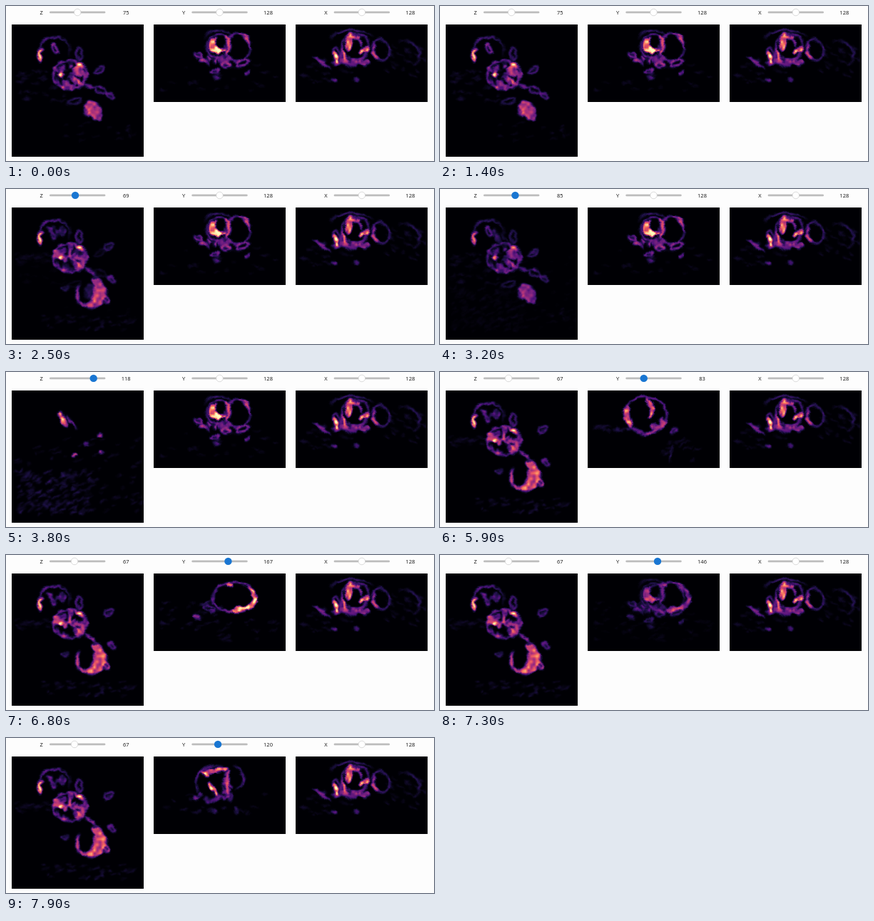
Write an HTML page with a canvas that moves like this. It is 600 px wide and 218 px high and loops after 8 s.

```html
<!DOCTYPE html>
<html>
<head>
<meta charset="utf-8">
<style>
html, body { margin: 0; width: 100%; height: 100%; overflow: hidden; background: #fdfdfd; }
canvas { display: block; }
</style>
</head>
<body>
<canvas id="stage" width="600" height="218"></canvas>
<script>
const W = 600, H = 218, LOOP = 8000, TOP = 26, TURN = 2 * Math.PI;
const view = document.getElementById('stage').getContext('2d');

function layer(w = W, h = H) {
  const c = document.createElement('canvas');
  c.width = w; c.height = h;
  return c.getContext('2d', { willReadFrequently: true });
}
const ink = layer(), soft = layer();

// Magma-like colour ramp
const stops = ['000004', '1c1044', '4f127b', '812581', 'b5367a', 'e55064', 'fb8761', 'fec287', 'fcfdbf']
  .map(s => [0, 2, 4].map(i => parseInt(s.substr(i, 2), 16)));
const ramp = Array.from({ length: 256 }, (_, i) => {
  const p = i / 255 * 8, k = Math.min(7, Math.floor(p));
  return stops[k].map((c, j) => c + (stops[k + 1][j] - c) * (p - k));
});

function seeded(seed) {
  return () => (seed = (seed * 16807) % 2147483647) / 2147483647;
}
const lattice = Array.from({ length: 4096 }, seeded(4711));
function noise(x, y) {
  const i = Math.floor(x), j = Math.floor(y), u = x - i, v = y - j;
  const at = (a, b) => lattice[(a + b * 67) & 4095];
  const top = at(i, j) * (1 - u) + at(i + 1, j) * u;
  const low = at(i, j + 1) * (1 - u) + at(i + 1, j + 1) * u;
  return top * (1 - v) + low * v;
}

// Drawing helpers: level is the brightness from 0 to 1
function spot(level, x, y, rx, ry = rx, turn = 0) {
  ink.fillStyle = `rgb(${Array(3).fill(Math.round(level * 255))})`;
  ink.beginPath();
  ink.ellipse(x, y, rx, ry, turn, 0, TURN);
  ink.fill();
}
// Stroke that swells towards its middle
function swell(level, width, point) {
  const steps = 60;
  for (let i = 0; i <= steps; i++) {
    const u = i / steps, [x, y] = point(u);
    spot(level, x, y, width / 2 * (.25 + .75 * Math.sin(Math.PI * u)));
  }
}
function bar(level, width, x0, y0, x1, y1) {
  swell(level, width, u => [x0 + (x1 - x0) * u, y0 + (y1 - y0) * u]);
}
function arc(level, width, x, y, rx, ry, from, to) {
  swell(level, width, u => {
    const a = from + (to - from) * u;
    return [x + rx * Math.cos(a), y + ry * Math.sin(a)];
  });
}
function ring(level, width, x, y, rx, ry = rx, turn = 0) {
  ink.strokeStyle = `rgb(${Array(3).fill(Math.round(level * 255))})`;
  ink.lineWidth = width;
  ink.beginPath();
  ink.ellipse(x, y, rx, ry, turn, 0, TURN);
  ink.stroke();
}
function lens(level, x, y, r, turn = 0) {
  ring(level, 2, x, y, r, r * .4, turn);
}
function scatter(count, level, x, y, rx, ry, seed) {
  const r = seeded(seed);
  for (let i = 0; i < count; i++) {
    const a = r() * TURN, d = Math.sqrt(r());
    lens(level * (.5 + .5 * r()), x + rx * d * Math.cos(a), y + ry * d * Math.sin(a), 2 + 3 * r(), r() * 3);
  }
}
function streaks(count, level, x, y, w, h, slope, seed) {
  const r = seeded(seed);
  for (let i = 0; i < count; i++) {
    const a = x + r() * w, b = y + r() * h, len = 3 + r() * 11;
    bar(level * (.4 + .6 * r()), 1.2, a, b, a + len, b + len * slope);
  }
}

// Parts that neighbouring Z slices share
function headAndBody(rim, seed) {
  arc(rim, 2.5, 68, 63, 22, 19, 2.6, 6.6);
  arc(.85, 5, 58, 70, 12, 13, 2.5, 4.1);
  lens(rim, 103, 67, 9, 1.5);
  ring(.36, 3, 90, 97, 23, 20);
  scatter(24, .58, 90, 97, 22, 19, seed);
  spot(.98, 77, 96, 3.5);
  spot(.85, 104, 84, 5, 2.5, .6);
  spot(.75, 102, 106, 5, 2.5, .9);
}

const zSlices = {
  67() {
    streaks(20, .11, 12, 90, 50, 15, -.12, 31);
    streaks(35, .14, 50, 178, 125, 22, -.2, 33);
    headAndBody(.36, 55);
    scatter(9, .42, 68, 62, 16, 13, 12);
    bar(.65, 4, 88, 82, 92, 102);
    bar(.42, 2.5, 110, 111, 130, 125);
    arc(.66, 17, 115, 145, 17, 19, -1.2, 1.7);
    arc(.52, 5, 117, 147, 18, 18, .8, 3.8);
    lens(.62, 141, 155, 6, 1.2);
    lens(.32, 143, 82, 7, -.65);
    lens(.38, 149, 127, 6, .8);
    lens(.26, 83, 140, 5);
  },
  75() {
    streaks(40, .11, 12, 90, 70, 45, -.15, 41);
    streaks(15, .1, 80, 165, 100, 30, -.2, 43);
    headAndBody(.3, 91);
    lens(.6, 68, 60, 7, 1.05);
    lens(.38, 130, 91, 7, -.7);
    lens(.42, 133, 119, 9, .5);
    lens(.36, 147, 126, 6, .6);
    lens(.27, 96, 134, 10, -.25);
    bar(.36, 2.5, 109, 111, 126, 116);
    spot(.5, 123, 147, 16, 9, .9);
    scatter(14, .68, 122, 147, 9, 11, 17);
  },
  118() {
    streaks(120, .21, 12, 140, 105, 62, -.6, 61);
    streaks(70, .12, 10, 95, 175, 105, -.35, 63);
    ring(.55, 2.2, 80, 67, 11, 3, 1.08);
    bar(.85, 4, 76, 58, 83, 75);
    bar(.45, 2.2, 84, 60, 101, 81);
    lens(.36, 113, 101, 3, 1.1);
    spot(.62, 131, 89, 2.3);
    spot(.82, 96, 117, 3.2, 2.3, -.5);
    spot(.52, 133, 113, 2.2);
  }
};

const ySlices = {
  83() {
    streaks(25, .17, 215, 75, 50, 8, .1, 71);
    streaks(12, .11, 310, 95, 45, 30, -.4, 73);
    ring(.38, 2.2, 288, 60, 30, 25, .1);
    arc(.7, 9, 292, 58, 31, 26, 2.4, 3.5);
    arc(.75, 7, 279, 54, 18, 19, -1, .6);
    scatter(9, .55, 303, 73, 10, 6, 74);
    arc(.42, 3, 288, 62, 28, 25, .3, 2.3);
    lens(.34, 328, 83, 5, -.4);
    bar(.19, 2, 326, 103, 322, 127);
  },
  120() {
    streaks(20, .12, 220, 78, 150, 30, .08, 81);
    arc(.36, 2.5, 294, 63, 28, 24, 2.4, 5.2);
    bar(.82, 6, 274, 48, 311, 44);
    spot(.9, 280, 51, 5, 3, .5);
    bar(.85, 5, 284, 62, 297, 81);
    bar(.66, 5, 312, 47, 309, 77);
    scatter(10, .45, 309, 62, 6, 16, 84);
    arc(.3, 2.5, 317, 57, 16, 17, -1.5, 1.4);
    scatter(14, .4, 292, 84, 27, 4, 86);
    lens(.22, 290, 103, 4);
    lens(.22, 323, 103, 4, 1.2);
  },
  128() {
    streaks(20, .1, 215, 80, 160, 40, .08, 91);
    arc(.27, 2, 298, 45, 19, 11, 3.1, 6.3);
    ring(.38, 2, 298, 56, 17, 16);
    arc(.96, 8, 299, 54, 11, 9, .9, 4.4);
    arc(.72, 4, 296, 56, 17, 16, -.9, .8);
    ring(.36, 2, 325, 59, 17, 20, .1);
    arc(.56, 4, 325, 59, 17, 20, -1.4, -.1);
    lens(.45, 269, 69, 6, .4);
    scatter(16, .45, 291, 76, 24, 5, 95);
    lens(.52, 308, 84, 6);
    lens(.52, 332, 81, 9, -.25);
    lens(.44, 293, 92, 6);
    lens(.38, 338, 94, 4, -.5);
    lens(.28, 294, 101, 4);
  },
  167() {
    streaks(30, .13, 215, 65, 80, 40, -.15, 101);
    streaks(20, .1, 295, 88, 85, 35, -.25, 103);
    ring(.45, 2.2, 320, 60, 30, 21);
    arc(.82, 6, 320, 60, 29, 20, -.8, 1.8);
    bar(.95, 5, 321, 76, 339, 75);
    spot(.65, 313, 43, 4, 2.2);
    lens(.34, 285, 75, 8, .3);
    lens(.42, 268, 87, 4, .4);
    bar(.22, 1.8, 270, 71, 289, 64);
  }
};

const xSlices = {
  128() {
    streaks(20, .1, 412, 75, 75, 35, .2, 111);
    streaks(25, .11, 530, 55, 52, 40, .5, 113);
    arc(.3, 2.2, 485, 46, 29, 12, 3, 6.1);
    ring(.36, 2, 490, 57, 19, 18);
    bar(.82, 9, 482, 39, 480, 62);
    bar(.72, 5, 481, 43, 497, 45);
    bar(.78, 5, 497, 65, 509, 59);
    bar(.5, 3, 494, 45, 499, 58);
    lens(.48, 464, 70, 12, 1.3);
    bar(.95, 6, 460, 65, 465, 80);
    bar(.66, 4, 470, 60, 478, 79);
    scatter(18, .46, 486, 81, 25, 6, 117);
    ring(.32, 2, 526, 62, 11, 16, -.2);
    arc(.55, 4, 526, 62, 11, 15, 1.8, 3.8);
    bar(.34, 4, 431, 72, 455, 87);
    arc(.19, 2.5, 555, 69, 25, 20, -1.8, .9);
    lens(.36, 461, 104, 3);
    lens(.25, 490, 104, 3);
  }
};

const panels = [
  { label: 'Z', max: 150, h: 185.6, slices: zSlices },
  { label: 'Y', max: 256, h: 108.7, slices: ySlices },
  { label: 'X', max: 256, h: 108.7, slices: xSlices }
];

// Renders one slice into brightness values, with warped and patchy outlines
function scan(panel, draw) {
  ink.globalCompositeOperation = 'source-over';
  ink.fillStyle = '#000';
  ink.fillRect(0, 0, W, H);
  ink.globalCompositeOperation = 'lighten';
  draw();
  soft.filter = 'blur(0.8px)';
  soft.drawImage(ink.canvas, 0, 0);
  const { data } = soft.getImageData(0, 0, W, H), { cols, rows } = panel;
  return Float32Array.from({ length: cols * rows }, (_, i) => {
    const x = i % cols, y = Math.floor(i / cols);
    const sx = Math.round(panel.x + x + 4 * (noise(x / 5, y / 5) - .5));
    const sy = Math.round(TOP + y + 4 * (noise(x / 5 + 31, y / 5 + 17) - .5));
    const patch = noise(x / 4 + 9, y / 4 + 23);
    return data[(sy * W + sx) * 4] * (.55 + .8 * patch);
  });
}
panels.forEach((p, i) => {
  p.x = 7.6 + 199.3 * i;
  p.w = 184.9;
  p.cols = Math.round(p.w);
  p.rows = Math.round(p.h);
  p.keys = Object.keys(p.slices).map(Number);
  p.scans = p.keys.map(k => scan(p, p.slices[k]));
  p.screen = layer(p.cols, p.rows);
  p.image = p.screen.createImageData(p.cols, p.rows);
});

function showSlice(p, value) {
  if (p.shown !== value) {
    p.shown = value;
    const { keys, scans } = p;
    let i = 0;
    while (i < keys.length - 2 && value > keys[i + 1]) i++;
    const j = Math.min(i + 1, keys.length - 1);
    const mix = i === j ? 0 : (value - keys[i]) / (keys[j] - keys[i]);
    const a = scans[i], b = scans[j];
    for (let n = 0; n < a.length; n++) {
      const level = Math.min(255, Math.round(a[n] + (b[n] - a[n]) * mix));
      p.image.data.set([...ramp[level], 255], n * 4);
    }
    p.screen.putImageData(p.image, 0, 0);
  }
  view.drawImage(p.screen.canvas, p.x, TOP, p.w, p.h);
}

function showSlider(p, value, active) {
  const left = p.x + 53.4, span = 78.4, y = 8.9;
  view.fillStyle = '#111';
  view.font = '7.5px "Open Sans", sans-serif';
  view.textAlign = 'center';
  view.fillText(p.label, p.x + 42.1, 11.7);
  view.fillText(value, p.x + 160.6, 11.7);
  view.fillStyle = '#bdbdbd';
  view.beginPath();
  view.roundRect(left, y - 1.3, span, 2.6, 1.3);
  view.fill();
  view.beginPath();
  view.arc(left + span * value / p.max, y, active ? 5.2 : 4.8, 0, TURN);
  view.fillStyle = active ? '#1976d2' : '#fff';
  view.fill();
  if (!active) {
    view.strokeStyle = '#ccc';
    view.lineWidth = .7;
    view.stroke();
  }
}

// Piecewise motion through [time, value] pairs
function along(t, track) {
  for (let i = 1; i < track.length; i++) {
    const [t0, v0] = track[i - 1], [t1, v1] = track[i];
    if (t <= t1) return Math.round(v0 + (v1 - v0) * (t - t0) / (t1 - t0));
  }
  return track[track.length - 1][1];
}
const zTrack = [[0, 75], [2000, 75], [2500, 69], [2900, 69], [3800, 118], [4500, 67]];
const yTrack = [[0, 128], [5300, 128], [5900, 83], [6800, 167], [7900, 120]];

function frame(now) {
  const t = Math.floor((now % LOOP) / 100) * 100;
  const values = [along(t, zTrack), along(t, yTrack), 128];
  const active = [t >= 1800 && t < 4900, t >= 5200, false];
  view.fillStyle = '#fdfdfd';
  view.fillRect(0, 0, W, H);
  panels.forEach((p, i) => {
    showSlider(p, values[i], active[i]);
    showSlice(p, values[i]);
  });
  requestAnimationFrame(frame);
}
frame(performance.now());
</script>
</body>
</html>
```
